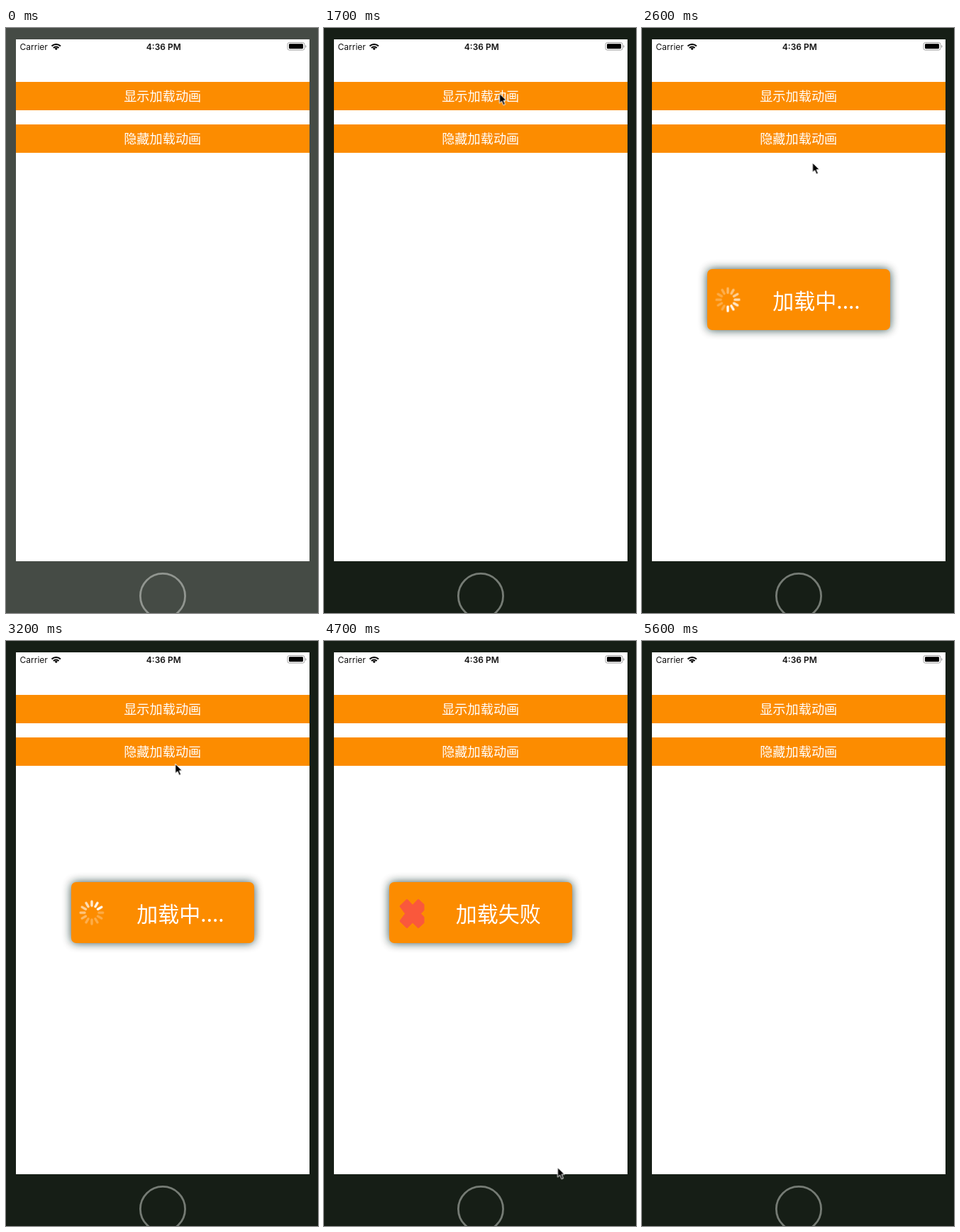
Recreate the animation shown at these times as an HTML page. Size 440 by 825 pixels, loop 5.9 s.

```html
<!DOCTYPE html>
<html lang="zh-CN">
<head>
<meta charset="utf-8">
<title>加载动画</title>
<style>
  html, body { margin: 0; width: 100%; height: 100%; overflow: hidden; background: #161e16; }
  svg { display: block; width: 440px; height: 825px; }
  text { font-family: "Noto Sans CJK SC", "Noto Sans CJK", sans-serif; text-anchor: middle; fill: #fff; }
  .status { font-family: Inter, sans-serif; font-size: 12px; fill: #111; }
  .label { font-size: 18.2px; }
  .message { font-size: 30px; font-weight: 300; }
  .orange { fill: #fc8c00; }

  .timed { animation: 5.9s step-end infinite; }
  #glare { animation-name: glare; }
  #panel { animation-name: panel; }
  #loading { animation-name: loading; }
  #spinner { animation-name: spinner; }
  #failed { animation-name: failed; }
  #cursor { animation-name: cursor; }
  #spokes { animation: spin calc(5.9s / 6) steps(12) infinite; }

  @keyframes glare { 0% { opacity: .2 } 1.69% { opacity: .1 } 3.38%, 100% { opacity: 0 } }
  @keyframes panel { 0% { opacity: 0 } 32.2% { opacity: 1 } 84.74%, 100% { opacity: 0 } }
  @keyframes loading { 0% { opacity: 1 } 69.49%, 100% { opacity: 0 } }
  @keyframes spinner { 0% { opacity: 1 } 66.1%, 100% { opacity: 0 } }
  @keyframes failed { 0% { opacity: 0 } 69.49%, 100% { opacity: 1 } }
  @keyframes spin { to { transform: rotate(360deg) } }
  @keyframes cursor {
    0% { transform: translate(-50px, -50px) }
    10.16% { transform: translate(247px, 77px); animation-timing-function: steps(4) }
    16.94% { transform: translate(247px, 95px) }
    28.81% { transform: translate(247.5px, 92.5px) }
    37.28% { transform: translate(247.5px, 92.5px); animation-timing-function: steps(4) }
    44.06% { transform: translate(240.5px, 190px) }
    49.15% { transform: translate(240.5px, 190px); animation-timing-function: steps(5) }
    57.62% { transform: translate(237.5px, 162px) }
    72.88% { transform: translate(237.5px, 162px); animation-timing-function: steps(4) }
    79.66% { transform: translate(329.5px, 742.5px) }
    81.35% { transform: translate(338px, 810px) }
    83.05% { transform: translate(-50px, -50px) }
    88.13% { transform: translate(206px, 816px); animation-timing-function: steps(2) }
    91.52% { transform: translate(230px, 809px); animation-timing-function: steps(2) }
    94.91%, 100% { transform: translate(-50px, -50px) }
    93.22% { transform: translate(244px, 814px) }
  }
</style>
</head>
<body>
<svg viewBox="0 0 440 825">
  <defs>
    <filter id="glow" x="-20%" y="-40%" width="140%" height="180%">
      <feGaussianBlur stdDeviation="6.5"/>
    </filter>
  </defs>

  <rect width="440" height="825" fill="#161e16"/>
  <circle cx="221" cy="801" r="31.6" fill="none" stroke="#757b74" stroke-width="2.8"/>
  <rect id="glare" class="timed" width="440" height="825" fill="#fff"/>
  <rect x="14" y="16" width="414" height="736" fill="#fff"/>

  <!-- status bar -->
  <text class="status" x="39.2" y="30.5">Carrier</text>
  <g transform="translate(70.7 31.2)">
    <path d="M-6.2-5.6a8.6 8.6 0 0 1 12.4 0M-3.8-3.1a5.2 5.2 0 0 1 7.6 0" fill="none" stroke="#000" stroke-width="2.1"/>
    <path d="M0 0L-2.2-2.2a3.1 3.1 0 0 1 4.4 0Z"/>
  </g>
  <text class="status" x="222.3" y="30.5" font-weight="600">4:36 PM</text>
  <rect x="397" y="20.5" width="24" height="10.6" rx="2.6" fill="none" stroke="#a0a0a0"/>
  <rect x="399" y="22.3" width="20" height="7" rx="1.2"/>
  <path d="M422.2 24a2 2 0 0 1 0 3.8Z" fill="#a0a0a0"/>

  <!-- buttons -->
  <rect class="orange" x="14" y="76" width="414" height="40"/>
  <text class="label" x="220.7" y="102.5">显示加载动画</text>
  <rect class="orange" x="14" y="136" width="414" height="40"/>
  <text class="label" x="220.7" y="162.5">隐藏加载动画</text>

  <g id="panel" class="timed">
    <rect x="92" y="340" width="258" height="86" rx="7" fill="#0f2820" opacity=".8" filter="url(#glow)"/>
    <rect class="orange" x="92" y="340" width="258" height="86" rx="7"/>
    <g id="loading" class="timed">
      <text class="message" x="246" y="395.5">加载中....</text>
      <g id="spinner" class="timed">
        <g transform="translate(121 383.2)"><g id="spokes"></g></g>
      </g>
    </g>
    <g id="failed" class="timed">
      <text class="message" x="245.7" y="395.5">加载失败</text>
      <path d="M117 365.5L125 374 133 365.5 140 372V379L135 384.5 140 390V397L133 403.5 125 395.5 117 403.5 108.2 395 116 384.5 108.2 374Z"
        fill="#fa583c" stroke="#fa583c" stroke-width="3" stroke-linejoin="round"/>
    </g>
  </g>

  <g id="cursor" class="timed">
    <path d="M0 0V13.6L3.2 10.7 5.5 16.2 8 15.2 5.7 9.8H9.9Z" stroke="#fff"/>
  </g>
</svg>
<script>
  // Twelve spokes fading anticlockwise from the brightest one.
  const spokes = document.getElementById('spokes');
  for (let i = 0; i < 12; i++) {
    const spoke = document.createElementNS('http://www.w3.org/2000/svg', 'rect');
    const attrs = {
      x: -1.7, y: -17.6, width: 3.4, height: 9.4, rx: 1.7, fill: '#fff',
      opacity: Math.max(.28, 1 - i * .1),
      transform: `rotate(${-30 * (i + 1)})`
    };
    for (const name in attrs) spoke.setAttribute(name, attrs[name]);
    spokes.append(spoke);
  }
</script>
</body>
</html>
```
